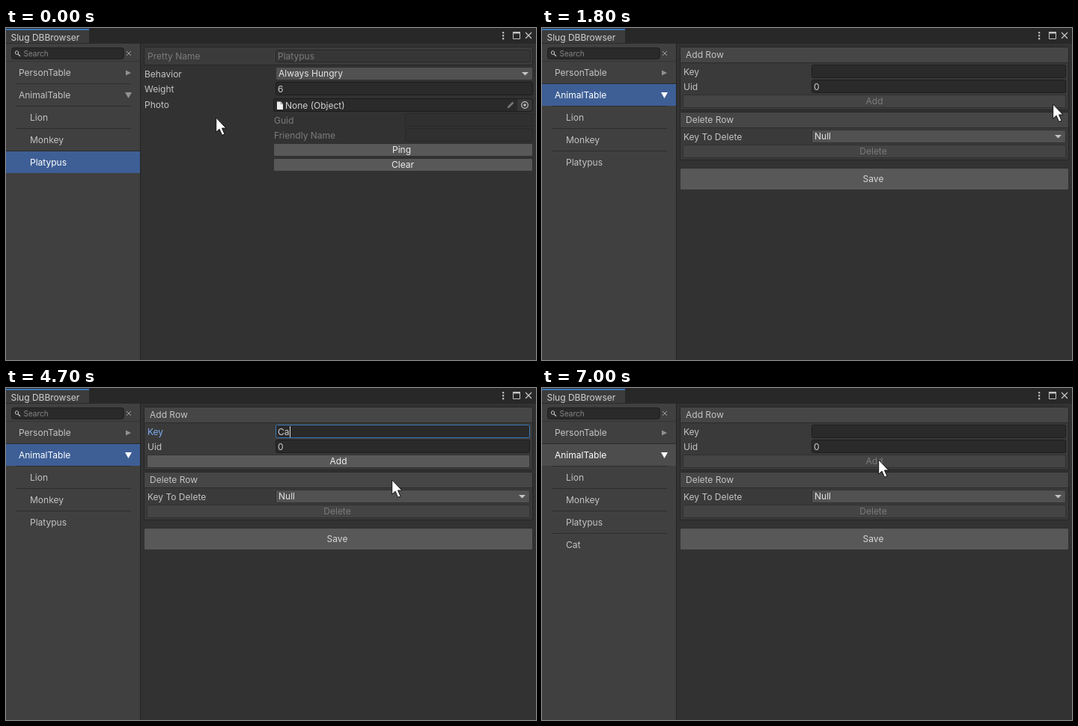
Recreate the animation shown at these times as an HTML page. Size 708 by 444 pixels, loop 8000 ms.

```html
<!DOCTYPE html>
<html lang="en">
<head>
<meta charset="utf-8">
<title>Slug DBBrowser</title>
<style>
html, body { margin: 0; width: 100%; height: 100%; overflow: hidden; background: #323232; }
svg { display: block; width: 708px; height: 444px; }
text { font: 12px Inter, Roboto, sans-serif; white-space: pre; }
</style>
</head>
<body>
<svg id="stage" viewBox="0 0 708 444"></svg>
<script>
const LOOP = 8000, STEP = 100;
const stage = document.getElementById('stage');
const pen = document.createElement('canvas').getContext('2d');

const LABEL = '#c4c4c4', BRIGHT = '#eeeeee', DIM = '#7b7b7b', FOCUS = '#7fadf2';

// Pointer positions: time, x, y
const path = [
  [0, 280, 119], [100, 288, 150], [200, 298, 215], [300, 299, 275], [400, 284, 305],
  [500, 230, 295], [600, 160, 255], [700, 95, 200], [800, 48, 128], [900, 70, 97],
  [1000, 76, 95],
  [1500, 120, 99], [1600, 320, 102], [1700, 560, 103], [1800, 682, 101], [1900, 500, 89],
  [2000, 355, 59], [2800, 364, 60], [2900, 394, 55],
  [3500, 412, 67], [3600, 478, 106], [3700, 515, 122],
  [6100, 513, 122], [6200, 492, 109], [6300, 461, 91], [6400, 449, 95]
];

const rect = (x, y, w, h, fill, r = 0) =>
  `<rect x="${x}" y="${y}" width="${w}" height="${h}" rx="${r}" fill="${fill}"/>`;

const frame = (x, y, w, h, fill, line, r = 2) =>
  `<rect x="${x + .5}" y="${y + .5}" width="${w - 1}" height="${h - 1}" rx="${r}" fill="${fill}" stroke="${line}"/>`;

const shape = (d, fill, line = 'none', width = 1) =>
  `<path d="${d}" fill="${fill}" stroke="${line}" stroke-width="${width}"/>`;

const text = (s, x, y, fill = LABEL, anchor = 'start', size = 12) =>
  `<text x="${x}" y="${y}" fill="${fill}" text-anchor="${anchor}" style="font-size:${size}px">${s}</text>`;

const field = (x, y, w, h, line = '#1c1c1c') => frame(x, y, w, h, '#2a2a2a', line);

const button = (x, y, w, h, label, cx, fill = '#585858', color = BRIGHT) =>
  frame(x, y, w, h, fill, '#303030') + text(label, cx, y + h / 2 + 4.4, color, 'middle');

const popup = (x, y, w, label) =>
  frame(x, y, w, 18, '#515151', '#303030') + text(label, x + 4, y + 13, '#e4e4e4') +
  shape(`M${x + w - 15} ${y + 7}h9l-4.5 4.5z`, '#c4c4c4');

const section = (y, h, label) =>
  frame(184, y, 520, h, '#3a3a3a', '#252525') + rect(185, y + 1, 518, 20, '#464646') +
  rect(185, y + 21, 518, 1, '#2a2a2a') + text(label, 192, y + 15);

function chrome() {
  return rect(0, 0, 708, 444, '#323232') + rect(0, 0, 708, 21, '#282828') +
    rect(0, 2, 111, 19, '#3c3c3c') + rect(0, 1, 111, 2, '#3a79bb') +
    text('Slug DBBrowser', 6.5, 17, '#d2d2d2') +
    [6, 10, 14].map(y => rect(663, y - 1, 2.4, 2.4, LABEL, 1)).join('') +
    shape('M677.5 6.5h9v8h-9z', 'none', LABEL) + rect(677, 5, 10, 2.5, LABEL) +
    shape('M694 6l8 8m0-8l-8 8', 'none', LABEL, 1.3);
}

function sidebar(t) {
  const names = ['PersonTable', 'AnimalTable', 'Lion', 'Monkey', 'Platypus'];
  if (t >= 7000) names.push('Cat');
  const chosen = t < 1200 ? 4 : 1;
  let out = rect(0, 21, 179, 423, '#404040') + rect(179, 21, 1, 423, '#232323') +
    rect(0, 20, 179, 1, '#2a2a2a') +
    frame(7, 26, 151, 16, '#2a2a2a', '#1e1e1e', 3) +
    `<circle cx="14.5" cy="33" r="2.2" fill="none" stroke="${LABEL}"/>` +
    shape('M16 34.7l3 3', 'none', LABEL, 1.3) +
    text('Search', 23.5, 38, '#858585', 'start', 10) +
    shape('M161 31l6 6m0-6l-6 6', 'none', '#a0a0a0') +
    rect(0, 44, 179, 1, '#353535');
  names.forEach((name, i) => {
    const y = 44 + i * 30, on = i === chosen;
    if (i) out += rect(13, y, 154, 1, '#2d2d2d');
    if (i === 1 && t === 1100) out += rect(0, y + 1, 179, 29, '#464646');
    if (on) out += rect(0, y, 179, 30, t >= 6900 ? '#4d4d4d' : '#3e5f96') + rect(0, y, 179, 1, '#2a2a2a');
    out += text(name, i < 2 ? 17 : 32, y + 20, on ? '#ffffff' : LABEL);
  });
  return out + shape('M160 56.5v7l7-3.5z', '#929292') +
    shape('M159 86h9l-4.5 8z', chosen === 1 ? '#ffffff' : '#929292');
}

function animalRow() {
  return frame(184, 25, 520, 25, '#3b3b3b', '#262626') +
    text('Pretty Name', 189, 42, DIM) +
    frame(360, 29, 341, 17, '#363636', '#292929') + text('Platypus', 363, 42, DIM) +
    text('Behavior', 185, 66) + popup(360, 52, 344, 'Always Hungry') +
    text('Weight', 185, 86) + field(360, 72, 344, 18) + text('6', 363, 86, '#d2d2d2') +
    text('Photo', 185, 107) + field(357, 94, 347, 18) + rect(683, 95, 20, 16, '#373737', 2) +
    shape('M362 98.5h5l3 3v7.5h-8z', '#eeeeee') + shape('M367 98.5v3h3', 'none', '#888888', .8) +
    text('None (Object)', 373, 108, '#d2d2d2') +
    shape('M669.5 107.5l1-3 6-6 2 2-6 6z', '#747474') +
    `<circle cx="693" cy="103" r="4.3" fill="none" stroke="${LABEL}" stroke-width="1.2"/>` +
    `<circle cx="693" cy="103" r="1.7" fill="${LABEL}"/>` +
    text('Guid', 358, 128, DIM) + frame(533, 114, 171, 18, '#303030', '#282828') +
    text('Friendly Name', 358, 148, DIM) + frame(533, 134, 171, 18, '#303030', '#282828') +
    button(357, 154, 347, 18, 'Ping', 528.5) + button(357, 174, 347, 18, 'Clear', 530);
}

function tableForm(t) {
  const typed = t < 4600 || t >= 7000 ? '' : t < 4700 ? 'C' : t < 5200 ? 'Ca' : 'Cat';
  const focused = t >= 3300 && t < 7000;
  const edge = t >= 3500 && t < 7000 ? '#3a79bb' : t >= 2900 && t < 3500 ? '#656565' : '#1c1c1c';
  const fill = !typed ? '#444444' : t === 6800 ? '#46607c' : t === 6900 ? '#676767' : '#585858';
  let out = section(25, 85, 'Add Row') +
    text('Key', 189, 63, focused ? FOCUS : LABEL) + field(360, 49, 340, 18, edge) +
    text(typed, 363, 63, '#d2d2d2') +
    text('Uid', 189, 83) + field(360, 69, 340, 18) + text('0', 363, 83, '#d2d2d2') +
    button(188, 89, 512, 18, 'Add', 444, fill, typed ? BRIGHT : DIM) +
    section(112, 65, 'Delete Row') +
    text('Key To Delete', 189, 150) + popup(360, 136, 340, 'Null') +
    button(188, 156, 512, 18, 'Delete', 442.5, '#444444', DIM) +
    button(184, 187, 520, 30, 'Save', 442.5, '#585858', '#d6d6d6');
  if (focused) {
    pen.font = '12px Inter, Roboto, sans-serif';
    out += rect(363 + Math.round(pen.measureText(typed).width), 51, 1, 15, '#d8d8d8');
  }
  return out;
}

function pointer(t) {
  const [, x, y] = path.filter(p => p[0] <= t).pop();
  const beam = t >= 2800 && t < 3300;
  const bar = 'M-3.5-8.5h2.5l1 1 1-1h2.5M0-7.5V8.5M-3.5 9.5h2.5l1-1 1 1h2.5';
  const arrow = 'M.7 1V20.2L5.1 16.2 8.6 24.3 12 22.8 8.5 15H14z';
  return `<g transform="translate(${x} ${y})">` + (beam
    ? shape(bar, 'none', '#111111', 3) + shape(bar, 'none', '#ffffff', 1.4)
    : shape(arrow, '#ffffff', '#111111')) + '</g>';
}

let shown = -1;
function draw(now) {
  const t = Math.floor(now % LOOP / STEP) * STEP;
  if (t !== shown) {
    shown = t;
    stage.innerHTML = chrome() + sidebar(t) + (t < 1200 ? animalRow() : tableForm(t)) + pointer(t);
  }
}

const start = performance.now();
function tick() {
  draw(performance.now() - start);
  requestAnimationFrame(tick);
}
tick();
</script>
</body>
</html>
```
